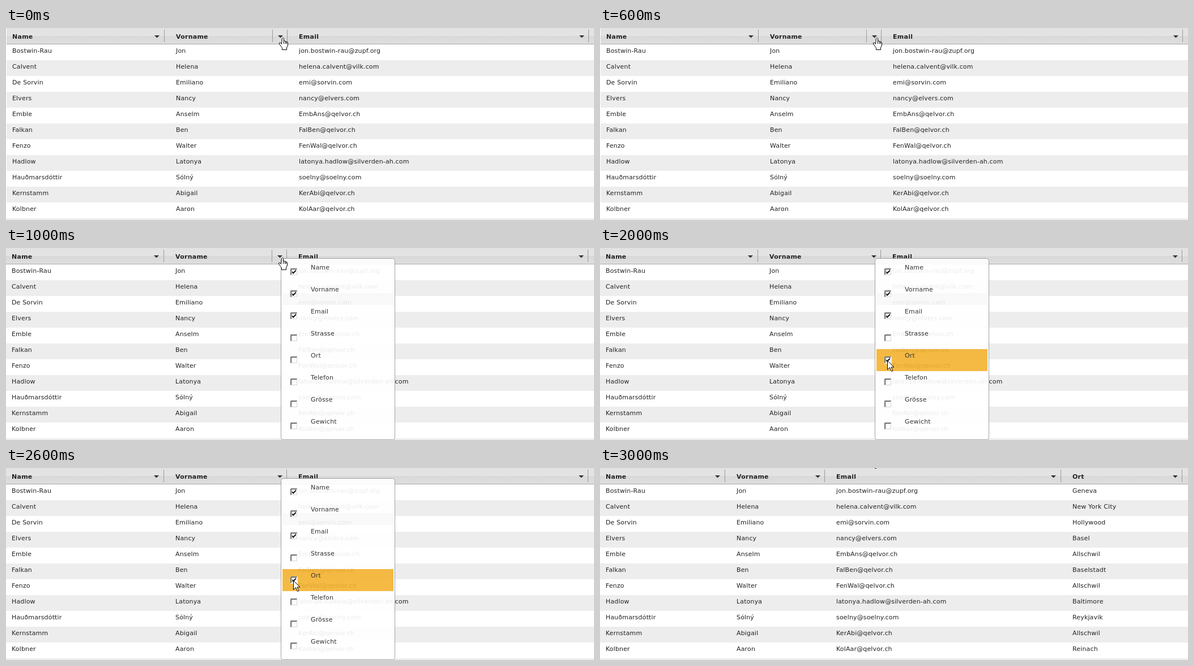
An HTML page that plays this animation: 1038x340 px, repeating every 4 s.

```html
<!DOCTYPE html>
<html lang="de">
<head>
<meta charset="utf-8">
<title>Spaltenauswahl</title>
<style>
  html, body { margin: 0; width: 100%; height: 100%; overflow: hidden; background: #fff; }
  svg { display: block; width: 1038px; height: 340px; }
  text { font: 11px "DejaVu Sans", sans-serif; letter-spacing: .15px; fill: #222; }
  .head text { font-weight: bold; letter-spacing: .25px; }
  .open, .picked, .hover, .result, .wide { animation: 4s step-end infinite; }
  .wide { animation-name: wide; }
  .hover { animation-name: hover; }
  .open { animation-name: open; }
  .picked { animation-name: picked; }
  .result { animation-name: result; }
  .nudge { animation: nudge 4s step-end infinite; }
  @keyframes wide { 0% { opacity: 1 } 75%, 100% { opacity: 0 } }
  @keyframes hover { 0% { opacity: 1 } 50%, 100% { opacity: 0 } }
  @keyframes open { 0% { opacity: 0 } 25% { opacity: 1 } 75%, 100% { opacity: 0 } }
  @keyframes picked { 0% { opacity: 0 } 50% { opacity: 1 } 75%, 100% { opacity: 0 } }
  @keyframes result { 0% { opacity: 0 } 75%, 100% { opacity: 1 } }
  @keyframes nudge { 0% { transform: translateX(1px) } 25%, 100% { transform: none } }
</style>
</head>
<body>
<svg id="stage" viewBox="0 0 1038 340">
  <defs>
    <linearGradient id="bar" x2="0" y2="1">
      <stop stop-color="#e2e2e2"/>
      <stop offset=".5" stop-color="#e4e4e4"/>
      <stop offset=".5" stop-color="#d9d9d9"/>
      <stop offset="1" stop-color="#dedede"/>
    </linearGradient>
  </defs>
  <g class="wide"><g class="nudge" id="wide"></g></g>
  <g class="result" id="result"></g>
  <g class="open"><g id="menu" opacity=".91"></g></g>
  <g class="hover"><g class="nudge">
    <g transform="translate(481 17)" stroke="#000" fill="none">
      <path fill="#fff" d="M5.5 1.5 6.5 .5h1l1 1v5l1-.5 2 .5 1 .5 2 .5 1 1.5v5l-1 2-1 2v3.5h-8v-3l-2-3-3-4.5v-1.5l1.5-.5 1.5 1 1 1.5z"/>
      <path d="M8.5 6v5M11.5 7v4M13.5 8v3"/>
    </g>
  </g></g>
  <path class="picked" fill="#fff" stroke="#000" d="M507.5 199.5v16l4-4 3 7 2.5-1-3-6.5h5z"/>
</svg>
<script>
  const people = [
    ["Bostwin-Rau", "Jon", "jon.bostwin-rau@zupf.org", "Geneva"],
    ["Calvent", "Helena", "helena.calvent@vilk.com", "New York City"],
    ["De Sorvin", "Emiliano", "emi@sorvin.com", "Hollywood"],
    ["Elvers", "Nancy", "nancy@elvers.com", "Basel"],
    ["Emble", "Anselm", "EmbAns@qelvor.ch", "Allschwil"],
    ["Falkan", "Ben", "FalBen@qelvor.ch", "Baselstadt"],
    ["Fenzo", "Walter", "FenWal@qelvor.ch", "Allschwil"],
    ["Hadlow", "Latonya", "latonya.hadlow@silverden-ah.com", "Baltimore"],
    ["Hauðmarsdóttir", "Sólný", "soelny@soelny.com", "Reykjavik"],
    ["Kernstamm", "Abigail", "KerAbi@qelvor.ch", "Allschwil"],
    ["Kolbner", "Aaron", "KolAar@qelvor.ch", "Reinach"]
  ];
  const labels = ["Name", "Vorname", "Email", "Strasse", "Ort", "Telefon", "Grösse", "Gewicht"];

  const rect = (x, y, w, h, fill, extra = "") =>
    `<rect x="${x}" y="${y}" width="${w}" height="${h}" fill="${fill}" ${extra}/>`;
  const text = (x, y, s) => `<text x="${x}" y="${y}">${s}</text>`;
  const divider = x => rect(x, 3, 1, 22, "#999");
  const arrow = x => `<path fill="#333" d="M${x - 4} 13h9l-4.5 4.5z"/>`;

  // Each column: title, text x, arrow x, divider x, index into a person's data.
  function table(columns, extra = "") {
    let out = rect(0, 0, 1038, 340, "#fff");
    for (let y = 57; y < 340; y += 56) out += rect(0, y, 1038, 28, "#ededed");
    out += rect(0, 0, 1038, 28, "url(#bar)") + rect(0, 28, 1038, 1, "#a9a9a9");
    out += '<g class="head">';
    for (const [title, x, arrowX, edge] of columns)
      out += text(x, 19, title) + arrow(arrowX) + divider(edge);
    out += "</g>" + extra;
    people.forEach((person, row) => {
      for (const [, x, , , key] of columns) out += text(x, 44 + row * 28, person[key]);
    });
    return out;
  }

  const tick = y => `<path fill="#000" d="M505 ${y + 5}v3l2 2 5-5v-3l-5 5z"/>`;

  function checkbox(y) {
    return rect(502, y, 13, 13, "#fff") +
      `<path fill="none" stroke="#808080" d="M502.5 ${y + 12}V${y + .5}H514"/>` +
      `<path fill="none" stroke="#404040" d="M503.5 ${y + 11}V${y + 1.5}H513"/>` +
      `<path fill="none" stroke="#d4d0c8" d="M503 ${y + 11.5}H513.5V${y + 1}"/>`;
  }

  function menu() {
    let out = rect(485.5, 18.5, 201, 321, "#fff", 'rx="4" stroke="#999"') +
      rect(488, 80, 197, 21, "#f9f9f9");
    labels.forEach((name, i) => {
      const top = 23 + i * 39, picked = name === "Ort";
      if (picked) out += rect(488, top, 196, 39, "#f4b432", 'class="picked"');
      out += checkbox(top + 13) + text(538, top + 15, name);
      if (i < 3) out += tick(top + 13);
      if (picked) out += `<g class="picked">${tick(top + 13)}</g>`;
    });
    return out;
  }

  const fill = (id, markup) => document.getElementById(id).innerHTML = markup;
  fill("wide", table([
    ["Name", 10, 265, 278, 0],
    ["Vorname", 299, 483, 495, 1],
    ["Email", 516, 1015, 1027, 2]
  ], `<g class="hover">${divider(469)}</g>`));
  fill("result", table([
    ["Name", 10, 207, 220, 0],
    ["Vorname", 241, 384, 396, 1],
    ["Email", 417, 800, 813, 2],
    ["Ort", 834, 1015, 1027, 3]
  ], rect(485, 0, 3, 1, "#222")));
  fill("menu", menu());
</script>
</body>
</html>
```
